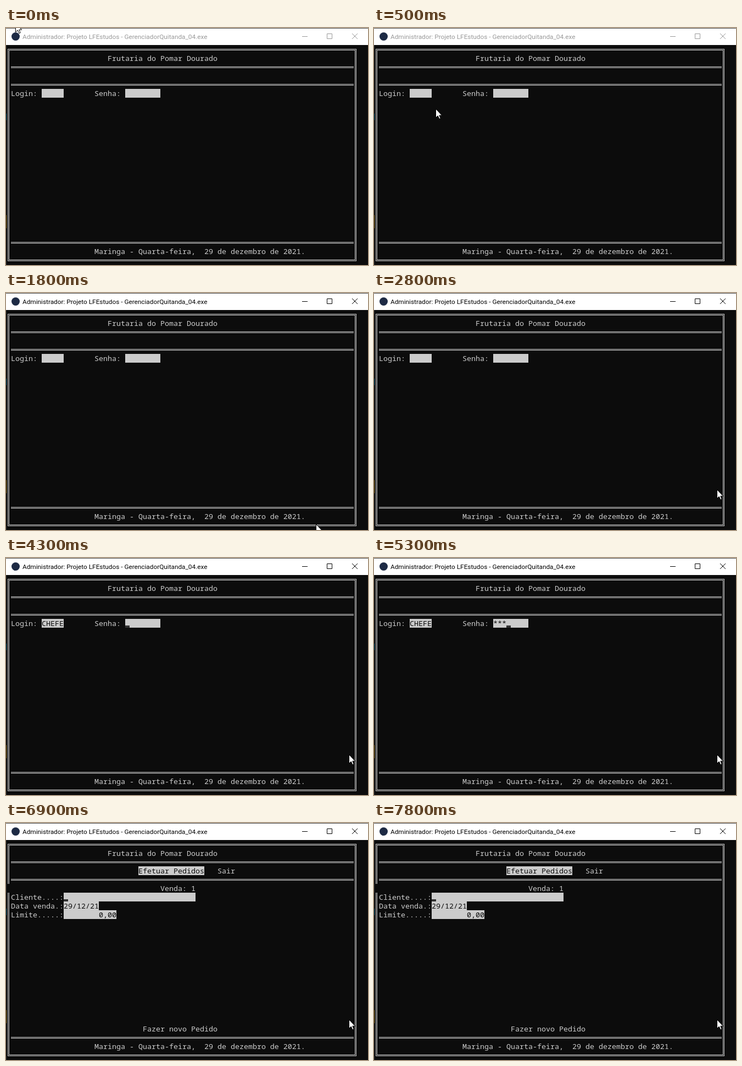
Animation, 659 px wide and 432 px high, one loop 8 s. Source, as an HTML page:

```html
<!DOCTYPE html>
<html lang="pt-BR">
<head>
<meta charset="utf-8">
<title>Console</title>
<style>
  html, body { margin: 0; width: 100%; height: 100%; overflow: hidden; background: #0c0c0c; }
  svg { display: block; }
  text { white-space: pre; }
  .mono { font: 13.3333px "Noto Sans Mono", "DejaVu Sans Mono", monospace; }
  .title { font: 11.8px Roboto, "Open Sans", sans-serif; }
</style>
</head>
<body>
<svg id="stage" width="659" height="432" viewBox="0 0 659 432"></svg>
<script>
const LOOP = 8000, STEP = 100, CW = 8, CH = 16, X0 = 1, Y0 = 31;
const INK = '#cccccc', PAPER = '#0c0c0c';
const USER = 'CHEFE';
const ACTIVE = 800, MENU = 5900, FORM = 6900;
const stage = document.getElementById('stage');

function add(parent, tag, attrs, content) {
  const el = document.createElementNS('http://www.w3.org/2000/svg', tag);
  for (const k in attrs) el.setAttribute(k, attrs[k]);
  if (content !== undefined) el.textContent = content;
  return parent.appendChild(el);
}
const rect = (p, x, y, width, height, fill) => add(p, 'rect', { x, y, width, height, fill });
const colX = c => X0 + c * CW;
const rowY = r => Y0 + r * CH;
const print = (p, c, r, s, fill = INK) =>
  add(p, 'text', { class: 'mono', x: colX(c), y: rowY(r) + 13, fill }, s);
const bar = (p, c, r, n) => rect(p, colX(c), rowY(r), n * CW, CH, INK);
function field(p, c, r, n, value = '') {
  bar(p, c, r, n);
  return print(p, c, r, value, PAPER);
}

// Window, with slivers of desktop on its left edge
rect(stage, 0, 0, 659, 432, PAPER);
rect(stage, 0, 0, 659, 31, '#ffffff');
rect(stage, 0, 0, 659, 1, '#4a4a4a');
rect(stage, 0, 31, 1, 401, '#222222');
rect(stage, 0, 156, 1, 12, '#15607a');
rect(stage, 0, 341, 1, 24, '#8a6a1c');

add(stage, 'circle', { cx: 17.5, cy: 15.5, r: 7.5, fill: '#1d2a44' });
const caption = add(stage, 'g', {});
add(caption, 'text', { class: 'title', x: 30, y: 20 },
  'Administrador: Projeto LFEstudos - GerenciadorQuitanda_04.exe');
add(caption, 'path', {
  d: 'M539 15.5h10M584.5 10.5h9v9h-9zM630 10l10 10M640 10l-10 10',
  fill: 'none', stroke: 'currentColor'
});

// Double-line frame
const lines = add(stage, 'g', { fill: 'none', stroke: INK });
for (const d of [0, 2])
  add(lines, 'rect', { x: 3.5 + d, y: 38.5 + d, width: 634 - 2 * d, height: 386 - 2 * d });
for (const r of [2, 4, 22]) {
  const y = rowY(r) + 7.5;
  add(lines, 'path', { d: `M9 ${y}H633M9 ${y + 2}H633` });
}
print(stage, 23, 1, 'Frutaria do Pomar Dourado');
print(stage, 20, 23, 'Maringa - Quarta-feira,  29 de dezembro de 2021.');

const login = add(stage, 'g', {});
print(login, 1, 5, 'Login:');
print(login, 20, 5, 'Senha:');
const userText = field(login, 8, 5, 5);
const passText = field(login, 27, 5, 8);

const menu = add(stage, 'g', {});
field(menu, 30, 3, 15, 'Efetuar Pedidos');
print(menu, 48, 3, 'Sair');
print(menu, 31, 21, 'Fazer novo Pedido');

const form = add(stage, 'g', {});
rect(form, 1, rowY(5), CW, CH, PAPER);
print(form, 35, 5, 'Venda: 1');
['Cliente....:', 'Data venda.:', 'Limite.....:'].forEach((s, i) => print(form, 1, 6 + i, s));
field(form, 13, 6, 30);
field(form, 13, 7, 8, '29/12/21');
field(form, 13, 8, 12, '0,00'.padStart(12));

const caret = rect(stage, 0, 0, CW, 4, '#333333');
const pointer = add(stage, 'path', {
  d: 'M-.5 -.5V15.5L3.2 12L5.8 17.7L8.2 16.7L5.8 11.2H10.6Z',
  fill: '#ffffff', stroke: '#000000'
});

// Pointer sweeps: quadratic curves between resting places
const rests = { top: [18, -8], left: [113, 148], middle: [263, 263], right: [625, 359] };
const sweeps = [
  { start: 200, end: 500, from: rests.top, bend: [70, 70], to: rests.left },
  { start: 800, end: 1300, from: rests.left, bend: [188, 206], to: rests.middle },
  { start: 1500, end: 2300, from: rests.middle, bend: [709, 540], to: rests.right }
];
function pointerAt(t) {
  const s = sweeps.filter(s => s.start <= t).pop();
  if (!s) return rests.top;
  const p = Math.min(1, (t - s.start + STEP) / (s.end - s.start + STEP));
  const v = (1 - p) ** 1.08, u = 1 - v;
  return s.from.map((a, i) => Math.round(v * v * a + 2 * u * v * s.bend[i] + u * u * s.to[i]));
}

// The caret blinks, and stays lit briefly after each key
const keys = [3200, 3400, 3500, 3700, 3800, 4900, 5100, 5300];
function caretLit(t) {
  if (t < 1300 || (t >= MENU && t < FORM)) return false;
  const blink = Math.floor((t - 2150) / 530) % 2 === 0;
  return blink || keys.some(k => t >= k && t < k + 2 * STEP);
}

const show = (el, on) => el.setAttribute('visibility', on ? 'visible' : 'hidden');

function render(t) {
  const tone = t < ACTIVE ? '#999999' : '#000000';
  caption.setAttribute('fill', tone);
  caption.setAttribute('color', tone);

  show(login, t < MENU);
  show(menu, t >= MENU);
  show(form, t >= FORM);

  const typed = keys.filter(k => k <= t).length;
  const secret = typed - USER.length;
  userText.textContent = USER.slice(0, typed);
  passText.textContent = '*'.repeat(Math.max(0, secret));

  const [col, row] = t >= FORM ? [13, 6] : [secret < 0 ? 8 + typed : 27 + secret, 5];
  show(caret, caretLit(t));
  caret.setAttribute('x', colX(col));
  caret.setAttribute('y', rowY(row) + 12);

  pointer.setAttribute('transform', `translate(${pointerAt(t)})`);
}

const start = performance.now();
function tick() {
  const t = (performance.now() - start) % LOOP;
  render(Math.floor(t / STEP) * STEP);
  requestAnimationFrame(tick);
}
tick();
</script>
</body>
</html>
```
